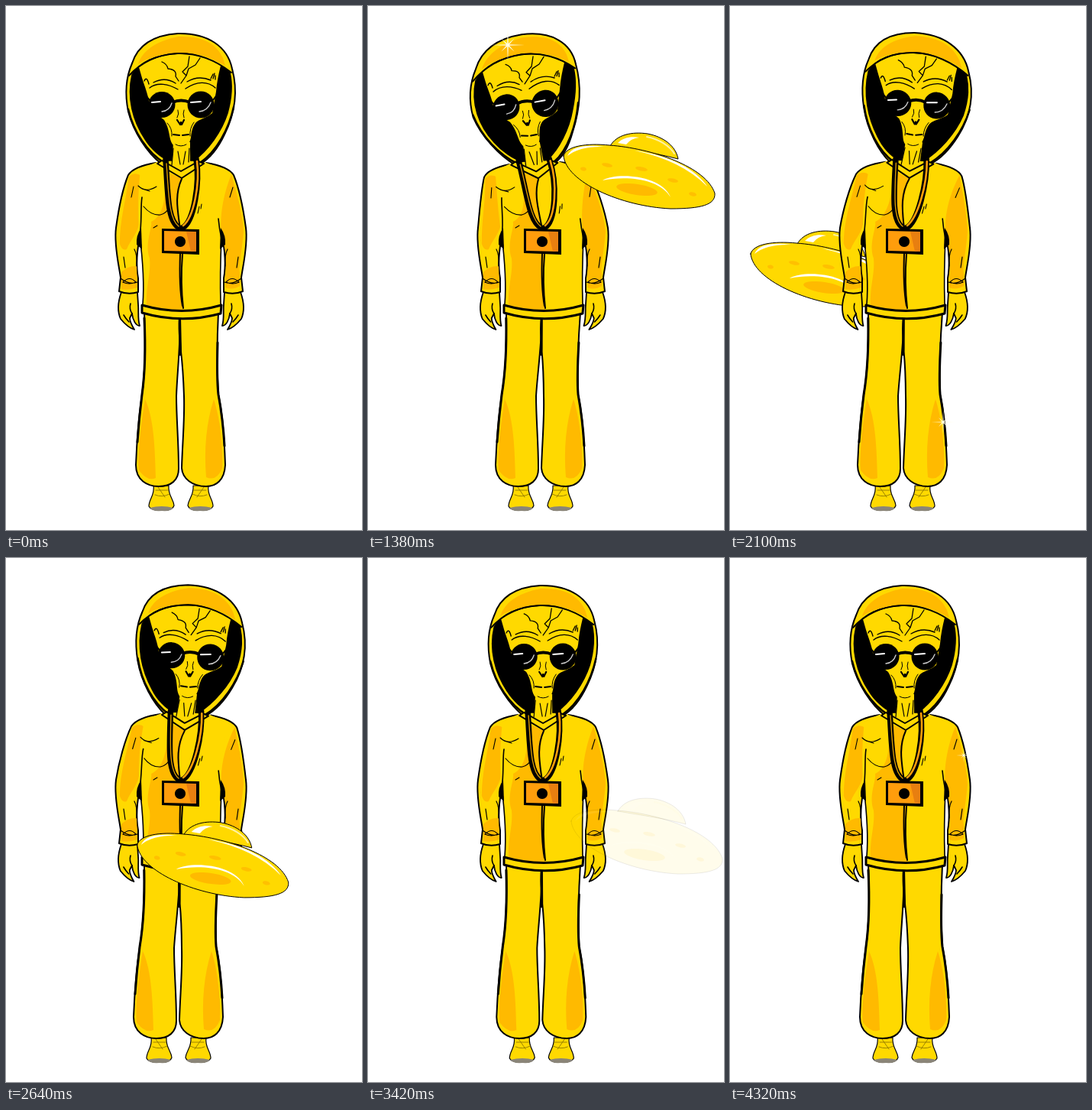
An HTML page with a canvas that plays this animation: 466x685 px, repeating every 4380 ms.

```html
<!DOCTYPE html>
<html lang="en">
<head>
<meta charset="utf-8">
<title>Golden alien</title>
<style>
html, body { margin: 0; width: 100%; height: 100%; overflow: hidden; background: #fff; }
canvas { display: block; }
</style>
</head>
<body>
<canvas id="stage" width="466" height="685"></canvas>
<script>
const ctx = document.getElementById('stage').getContext('2d');
const LOOP = 4380, STEP = 60;
const GOLD = '#ffd900', AMBER = '#ffba00', INK = '#000', WHITE = '#fff', GREY = '#8a8578';

const mapPoints = (d, fn) =>
  d.replace(/(-?[\d.]+) (-?[\d.]+)/g, (_, x, y) => fn(+x, +y).map(n => n.toFixed(2)).join(' '));
const fill = (color, d) => ({ d, color });
const line = (width, d, stroke = INK) => ({ d, width, stroke });
const shape = (color, width, d) => ({ d, color, width, stroke: INK });
const flip = s => ({ ...s, d: mapPoints(s.d, (x, y) => [458 - x, y]) });
const both = (...list) => [...list, ...list.map(flip)];
const oval = (x, y, a, b, tilt = 0) => {
  const c = Math.cos(tilt), s = Math.sin(tilt), k = .5523;
  const unit = 'M1 0 C1 K K 1 0 1 C-K 1 -1 K -1 0 C-1 -K -K -1 0 -1 C K -1 1 -K 1 0Z';
  return mapPoints(unit.replace(/K/g, k), (u, v) => [x + u * a * c - v * b * s, y + u * a * s + v * b * c]);
};

const legs = [
  ...both(
    shape(GOLD, 1.2, 'M193 627 C195 640 187 644 187 654 Q190 660 204 659 Q218 660 220 653 C219 644 212 640 213 627Z'),
    fill(GREY, 'M188 656 Q204 652 219 656 Q216 661 204 660 Q191 661 188 656Z'),
    line(1, 'M196 633 L212 633 M195 639 Q204 643 214 638 M199 629 L208 642', '#9b8300')),
  shape(GOLD, 2, 'M181 400 C183 450 182 480 178 508 C174 535 171 575 170 600 C170 620 185 628 200 628 C216 628 226 620 226 605 C226 570 223 540 223 510 C224 480 228 450 228 406Z'),
  shape(GOLD, 2, 'M228 406 L278 400 C276 440 276 475 278 508 C283 530 286 570 287 600 C286 620 275 628 262 628 C244 628 231 618 230 604 C231 570 234 540 233 510 C232 480 230 460 229 452Z'),
  line(3, 'M181 408 C183 450 182 480 178 508 Q174 540 172 570 M277 440 C276 475 276 490 278 508 Q284 540 286 575'),
  line(2.5, 'M227 410 C226 430 229 440 228 456'),
  fill(AMBER, 'M182 514 C178 540 172 580 174 607 Q185 622 196 617 C195 580 194 540 182 514Z'),
  fill(AMBER, 'M272 514 C262 545 259 580 262 616 Q276 622 283 604 C284 570 279 535 272 514Z')
];

const hands = both(
  shape(GOLD, 1.8, 'M151 374 C146 388 146 400 150 409 C155 415 161 421 168 423 C165 418 162 413 162 408 L165 402 C166 411 170 418 175 418 C172 408 174 400 173 390 L172 374Z'),
  line(1.6, 'M154 404 Q157 409 161 413 M165 402 Q161 396 163 389'));

const sleeves = [
  ...both(shape(GOLD, 2, 'M196 205 C178 208 165 213 160 221 C153 238 147 268 144 290 C141 312 148 340 150 355 L148 373 Q160 378 173 374 L173 356 C170 340 171 318 176 300 L196 260Z')),
  fill(AMBER, 'M161 223 C153 248 147 275 146 300 Q150 322 158 318 C163 305 171 300 174 285 L177 222 Q169 216 161 223Z'),
  fill(GOLD, 'M161 221 C153 248 146 275 146 300 L149 312 C148 282 158 250 161 221Z'),
  fill(AMBER, 'M295 220 C301 242 309 267 311 295 C309 322 304 340 306 350 L306 366 Q296 372 287 368 C287 345 291 325 285 312 C277 285 283 250 295 220Z'),
  fill(AMBER, 'M151 348 Q160 339 171 340 L172 368 Q160 372 151 370Z')
];

const jacket = [
  fill(GOLD, 'M200 203 L176 213 C172 250 172 285 176 310 C180 345 180 370 179 392 Q230 403 282 392 C280 360 281 325 282 300 C276 280 282 250 286 214 L257 203 L229 222Z'),
  fill(AMBER, 'M209 216 L230 226 C222 255 226 290 230 326 L232 397 Q205 397 184 391 C183 365 190 350 188 330 C181 310 192 290 190 282 C206 275 210 250 209 216Z'),
  line(1.6, 'M178 250 C176 262 178 285 175 300 C180 340 181 365 179 390 M281 390 C280 355 281 325 282 304 Q279 290 278 278'),
  ...both(fill(INK, 'M177 290 Q170 300 171 312 L178 318Z')),
  line(1.1, 'M173 235 Q183 245 197 236 M178 239 L188 242 M180 262 Q190 274 202 273 Q210 271 213 264 M193 290 L198 287 M167 236 L164 250 M251 271 L253 262 M255 265 L256 259 M297 237 L293 250'),
  ...both(line(1.2, 'M150 356 Q161 365 172 361 M153 361 Q162 352 170 361 Q161 365 153 361 M154 328 L156 342 M168 318 Q172 325 171 340')),
  line(2, 'M230 226 C220 248 225 268 228 292 M231 324 C229 350 229 370 232 395 M228 324 C227 350 227 370 231 392'),
  shape(GOLD, 3, 'M178 391 Q230 406 282 391 L281 402 Q230 416 178 401Z')
];

const hood = [
  shape(GOLD, 2, 'M225 36 C264 35 290 53 296 82 C304 112 299 142 286 168 C277 187 267 199 255 206 L229 222 L203 206 C185 192 167 165 160 138 C155 113 158 91 165 75 C173 50 195 38 225 36Z'),
  fill(AMBER, 'M173 76 C178 60 194 46 226 40 C258 39 276 50 284 68 L287 78 C266 66 245 60 225 62 C202 63 184 68 173 76Z'),
  shape(INK, 1.5, 'M165 90 C158 120 166 150 182 174 C190 187 203 198 213 202 L246 202 C264 189 282 165 290 140 C297 115 296 100 293 87 C270 68 245 61 225 62 C195 64 175 74 165 90Z'),
  line(2.5, 'M160 135 C167 165 185 191 207 205 M298 132 C292 160 276 190 254 205'),
  fill(GOLD, 'M219 178 L217 213 L229 220 L241 211 L241 178Z'),
  fill(GOLD, 'M174 80 C195 66 212 63 226 63 C248 62 265 68 281 78 C278 90 276 100 275 112 L270 140 C262 147 252 148 248 153 C244 158 243 164 242 172 C240 182 235 186 229 186 C222 186 217 182 215 174 C213 164 212 157 207 149 L188 134 C188 120 181 104 178 94Z'),
  line(2, 'M161 91 C178 73 195 64 225 62 C250 61 275 71 295 87')
];

const face = [
  line(1.3, 'M204 73 Q211 76 212 82 Q224 83 222 92 L226 98 M240 66 L238 79 L231 86 L236 91 L229 101 M254 68 L248 77 L239 82 L236 91'),
  line(1.4, 'M181 98 Q184 91 187 102 M188 107 C198 99 213 102 225 109 M235 108 C250 98 264 98 274 107 M193 100 Q208 92 222 101 M237 99 Q252 90 268 97'),
  line(1.3, 'M268 95 L271 89 M271 95 L273 88 M274 96 L274 91'),
  fill(INK, oval(204, 129, 17.5, 17)),
  fill(INK, oval(255, 129, 17.5, 17.5)),
  line(4, 'M218 126 Q229 121 241 126'),
  line(2, 'M188 123 L181 115 M271 123 L277 115'),
  line(2, 'M191 126 L202 125 M242 126 L255 125', WHITE),
  line(1.4, 'M204 138 Q214 137 217 127 M253 138 Q264 137 268 126', '#c9c9c9'),
  line(2.2, 'M224 149 L228 155 L229 152 L230 155 L233 149'),
  line(1, 'M224 146 Q227 141 225 136 M233 146 Q231 141 233 136'),
  line(2, 'M219 168 L227 169 M231 169 L239 168'),
  line(1, 'M211 153 Q218 160 217 170 M246 152 Q240 160 241 170 M222 181 Q229 185 236 181'),
  line(1.2, 'M219 186 L217 208 M240 186 L239 204 M225 190 L228 207 M235 190 L232 207')
];

const lanyard = [
  shape(GOLD, 2, 'M204 202 L229 216 L252 203 L259 206 L230 225 L198 206Z'),
  line(7.5, 'M209 201 C212 245 211 282 227 290 M249 200 C254 232 246 282 231 290'),
  line(1.4, 'M210 206 C213 245 213 278 226 288', '#d79a00'),
  line(2.6, 'M250 203 C254 232 246 276 232 287', '#ff9f0a'),
  fill(INK, 'M204 291 L253 292 L253 325 L204 323Z'),
  fill('#ff9d0c', 'M207 294 L249 295 L249 321 L207 320Z'),
  fill('#e87f10', 'M236 295 L249 295 L249 321 L242 321Z'),
  fill(INK, oval(228, 308, 7, 7))
];

const saucer = [
  shape(GOLD, 1, 'M136 453 C144 438 165 434 185 437 C206 441 222 453 225 470 C195 462 165 458 136 453Z'),
  fill(WHITE, 'M146 449 C153 442 163 440 174 442 Q163 443 157 451Z'),
  line(2, 'M184 441 C200 444 214 453 220 463', '#fff3a0'),
  shape(GOLD, 1, 'M75 466 C78 453 105 449 135 452 C190 456 262 480 273 515 C274 530 255 535 215 535 C150 532 78 500 75 466Z'),
  fill(WHITE, 'M80 466 C86 453 105 451 128 454 Q96 453 80 466Z'),
  fill(WHITE, 'M168 459 C215 465 250 485 263 506 Q230 472 168 459Z'),
  fill(WHITE, 'M126 498 C145 487 203 491 215 520 C202 497 160 491 126 498Z'),
  fill(AMBER, oval(171, 510, 27, 7, .15)),
  ...[[101, 483, 4], [132, 478, 7], [177, 483, 8], [218, 498, 7], [244, 516, 5]]
    .map(([x, y, r]) => fill('#ffc000', oval(x, y, r, 2.5, .2)))
];

// Smooth curve through [time, value] keys, flat at every turning point.
function track(keys) {
  const rate = i => (keys[i + 1][1] - keys[i][1]) / (keys[i + 1][0] - keys[i][0]);
  const slope = i => {
    if (i < 1 || i > keys.length - 2) return 0;
    const a = rate(i - 1), b = rate(i);
    return a * b > 0 ? 2 * a * b / (a + b) : 0;
  };
  return t => {
    if (t <= keys[0][0]) return keys[0][1];
    const i = keys.findIndex(k => k[0] > t) - 1;
    if (i < 0) return keys[keys.length - 1][1];
    const [t0, a] = keys[i], [t1, b] = keys[i + 1];
    const h = t1 - t0, u = (t - t0) / h, v = 1 - u;
    return v * v * (1 + 2 * u) * a + u * u * (3 - 2 * u) * b + u * v * h * (v * slope(i) - u * slope(i + 1));
  };
}

const sway = track([[400, 0], [840, -4.5], [1400, -24], [2130, 16.5], [3120, 7], [3780, -6], [4320, 0]]);
const lean = track([[600, 0], [840, -.5], [1380, -3], [3120, -3], [3780, 0]]);
const saucerX = track([[60, -16], [570, -16], [840, 0], [1080, 86], [1380, 181], [1430, 185], [1620, 146], [2100, -48], [2160, -54], [2700, 113], [3120, 186], [3300, 191]]);
const saucerY = track([[60, 22], [540, 22], [840, 0], [1080, -115], [1380, -270], [1500, -282], [2100, -142], [2560, -90], [3120, -115], [3400, -122]]);
const fade = track([[60, 0], [540, 1], [3030, 1], [3500, 0]]);

const sparkles = [
  [183, 51, 22, 1180, 1580], [279, 544, 22, 1800, 2200], [214, 356, 22, 2920, 3320],
  [253, 651, 16, 3580, 3980], [306, 258, 16, 4020, 4400]
];

const clamp = n => Math.max(0, Math.min(1, n));

function draw(list, warp) {
  for (const s of list) {
    const path = new Path2D(warp ? mapPoints(s.d, warp) : s.d);
    if (s.color) { ctx.fillStyle = s.color; ctx.fill(path); }
    if (s.width) { ctx.strokeStyle = s.stroke; ctx.lineWidth = s.width; ctx.stroke(path); }
  }
}

function drawSaucer(t) {
  ctx.save();
  ctx.globalAlpha = clamp(fade(t));
  ctx.translate(saucerX(t), saucerY(t));
  draw(saucer);
  ctx.restore();
}

function drawSparkle(t, [x, y, size, from, to]) {
  if (t < from || t > to) return;
  const r = size * Math.sin(Math.PI * (t - from) / (to - from));
  ctx.beginPath();
  for (let i = 0; i < 16; i++) {
    const k = r * (i % 2 ? .1 : i % 4 ? .55 : 1), a = i * Math.PI / 8;
    ctx.lineTo(x + k * Math.cos(a), y + k * Math.sin(a));
  }
  ctx.fillStyle = '#fffbe0';
  ctx.fill();
}

function render(t) {
  const head = sway(t), shift = lean(t);
  const warp = (x, y) => {
    const u = clamp((290 - y) / 180), w = u * u * (3 - 2 * u);
    return [x + head * w + shift * clamp((y - 400) / 110), y + head * w * (x - 238) / 240];
  };
  const behind = t > 1440 && t < 2190;
  ctx.clearRect(0, 0, 466, 685);
  ctx.lineCap = ctx.lineJoin = 'round';
  if (behind) drawSaucer(t);
  for (const part of [legs, hands, sleeves, jacket, hood, face, lanyard]) draw(part, warp);
  if (!behind) drawSaucer(t);
  sparkles.forEach(s => drawSparkle(t, s));
}

const start = performance.now();
function tick() {
  const t = (performance.now() - start) % LOOP;
  render(Math.floor(t / STEP) * STEP);
  requestAnimationFrame(tick);
}
tick();
</script>
</body>
</html>
```
